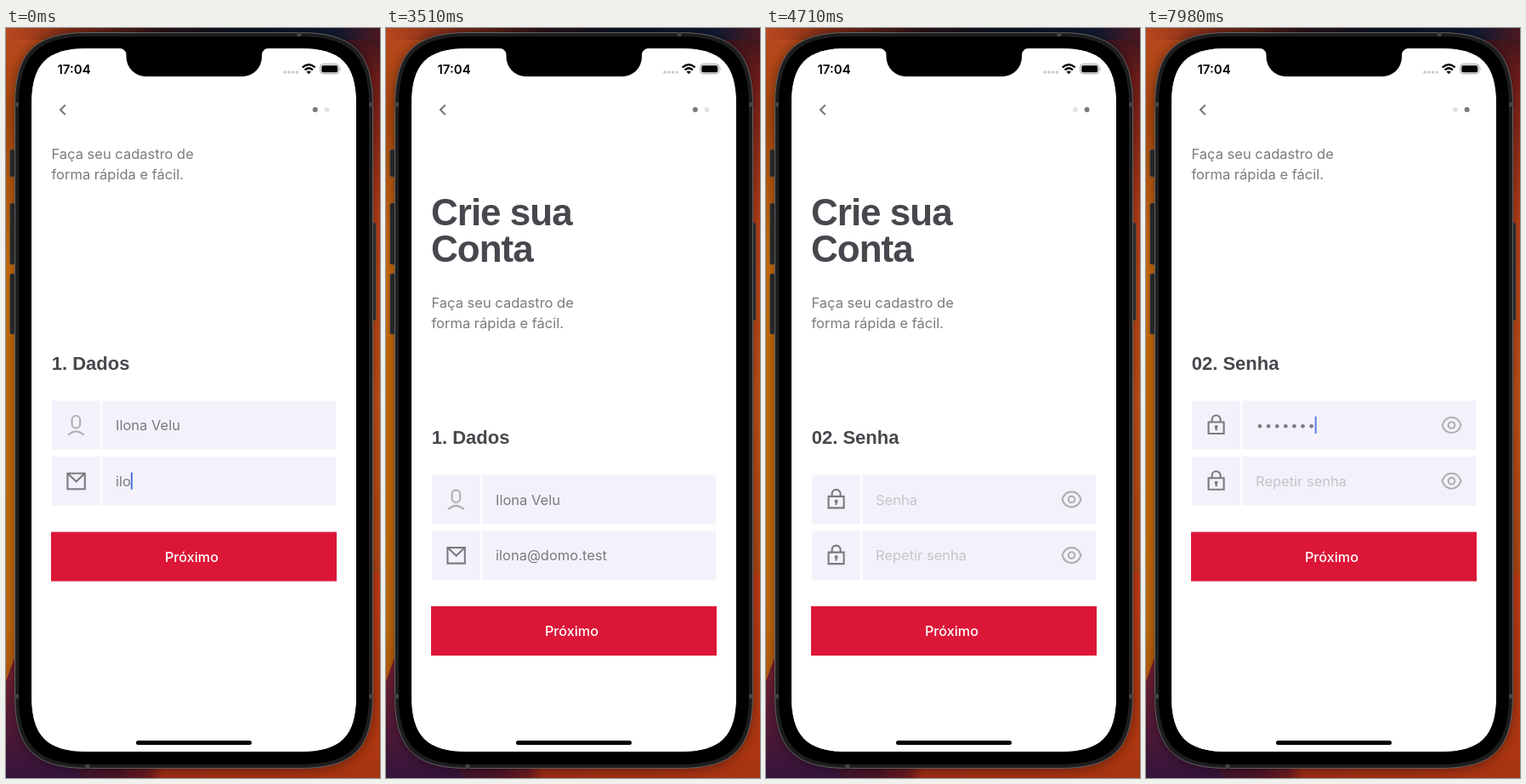
These frames come from a looping animation (440x882 px, 8 s). An HTML page:

```html
<!DOCTYPE html>
<html lang="pt-BR">
<head>
<meta charset="utf-8">
<title>Cadastro</title>
<style>
  html, body { margin: 0; width: 100%; height: 100%; overflow: hidden; background: #000; }
  svg { display: block; width: 100vw; height: 100vh; }
  text { font-family: Inter, sans-serif; font-size: 16.5px; fill: #7a7a80; white-space: pre; }
  .title, .section { font-family: "Liberation Sans", Arial, sans-serif; font-weight: 700; fill: #47474d; }
  .title { font-size: 44px; letter-spacing: -1px; }
  .section { font-size: 22px; }
  .hint { fill: #c4c4ca; }
  .label { font-size: 16.2px; font-weight: 500; fill: #fff; text-anchor: middle; }
  .clock { font-size: 15px; font-weight: 600; fill: #000; }
  .icon { fill: none; stroke: #7a7a80; stroke-width: 2.1; }
  .soft { stroke: #aeaeb3; }
</style>
</head>
<body>
<svg viewBox="0 0 440 882" preserveAspectRatio="none">
  <defs>
    <linearGradient id="left" x2="0" y2="1">
      <stop offset="0" stop-color="#b8481e"/><stop offset=".12" stop-color="#a9480f"/>
      <stop offset=".3" stop-color="#c8690e"/><stop offset=".55" stop-color="#c56a08"/>
      <stop offset=".8" stop-color="#c0680c"/><stop offset="1" stop-color="#a03e18"/>
    </linearGradient>
    <linearGradient id="right" x2="0" y2="1">
      <stop offset="0" stop-color="#30141f"/><stop offset=".07" stop-color="#741d1a"/>
      <stop offset=".25" stop-color="#b43e19"/><stop offset=".5" stop-color="#c25018"/>
      <stop offset=".725" stop-color="#b04614"/><stop offset=".73" stop-color="#c23c16"/>
      <stop offset="1" stop-color="#a83510"/>
    </linearGradient>
    <linearGradient id="top">
      <stop offset="0" stop-color="#b8481e"/><stop offset=".2" stop-color="#7c2a17"/>
      <stop offset=".42" stop-color="#2a1218"/><stop offset=".6" stop-color="#0d1222"/>
      <stop offset=".88" stop-color="#111a33"/><stop offset="1" stop-color="#4c1820"/>
    </linearGradient>
    <linearGradient id="bottom">
      <stop offset="0" stop-color="#34143a"/><stop offset=".3" stop-color="#4a1426"/>
      <stop offset=".38" stop-color="#6a1a1e"/><stop offset=".42" stop-color="#9c2c16"/>
      <stop offset="1" stop-color="#a83510"/>
    </linearGradient>
    <linearGradient id="dusk" x2="0" y2="1">
      <stop offset="0" stop-color="#7a2232"/><stop offset="1" stop-color="#34143a"/>
    </linearGradient>
    <filter id="blur"><feGaussianBlur stdDeviation="7"/></filter>
    <path id="body" d="M10.500 91.500C10.500 28.500 33.500 5.500 96.500 5.500H345.500C408.500 5.500 431.500 28.500 431.500 91.500V784.500C431.500 847.500 408.500 870.500 345.500 870.500H96.500C33.500 870.500 10.500 847.500 10.500 784.500Z"/>
    <path id="glass" d="M30 90C30 42 48 24 96 24H346C394 24 412 42 412 90V785C412 833 394 851 346 851H96C48 851 30 833 30 785Z"/>
    <clipPath id="display"><use href="#glass"/></clipPath>
  </defs>

  <g id="wallpaper">
    <rect width="220" height="882" fill="url(#left)"/>
    <rect x="220" width="220" height="882" fill="url(#right)"/>
    <rect width="440" height="14" fill="url(#top)"/>
    <rect y="862" width="440" height="20" fill="url(#bottom)"/>
    <path d="M0 768L11 738L90 882H0Z" fill="url(#dusk)"/>
    <use href="#body" filter="url(#blur)" opacity=".45"/>
  </g>

  <g id="phone">
    <g fill="#252526" stroke="#484848" stroke-width=".8">
      <rect x="4.8" y="143" width="8" height="32" rx="2"/>
      <rect x="4.8" y="206" width="8" height="72" rx="2"/>
      <rect x="4.8" y="289" width="8" height="71" rx="2"/>
      <rect x="427" y="229" width="8" height="115" rx="2"/>
    </g>
    <use href="#body" fill="#1d1d1e" stroke="#626264"/>
    <path d="M15 92C15 32 37 10 97 10H345C405 10 427 32 427 92V784C427 844 405 866 345 866H97C37 866 15 844 15 784Z"/>
    <path d="M10 90h5M427 90h5M10 786h5M427 786h5M96 866v5M345 5v5" stroke="#444" stroke-width="5"/>
  </g>

  <g clip-path="url(#display)">
    <use href="#glass" fill="#fff"/>
    <g id="screens"></g>
  </g>

  <g id="status">
    <path d="M134 24A7.500 7.500 0 0 1 141.500 31.500V34A23 23 0 0 0 164.500 57H278A23 23 0 0 0 301 34V31.500A7.500 7.500 0 0 1 308.500 24V22H134Z"/>
    <text class="clock" x="60.500" y="53.500">17:04</text>
    <g fill="#c9c9cb">
      <circle cx="328" cy="52" r="1.8"/><circle cx="332.700" cy="52" r="1.8"/>
      <circle cx="337.400" cy="52" r="1.8"/><circle cx="342.100" cy="52" r="1.8"/>
    </g>
    <g fill="none" stroke="#000" stroke-width="2.3">
      <path d="M348.800 46.300Q356.200 39.600 363.600 46.300M351.500 49.300Q356.200 45.200 360.900 49.300"/>
    </g>
    <path d="M353.600 51.500Q356.200 49.300 358.800 51.500L356.200 54.200Z"/>
    <rect x="369.800" y="42.400" width="22" height="11.400" rx="3.400" fill="none" stroke="#999"/>
    <rect x="371.300" y="43.900" width="19" height="8.400" rx="2"/>
    <path d="M393 46.300q1.600 1.700 0 3.600z" fill="#999"/>
    <rect x="153" y="838" width="136" height="5" rx="2.500"/>
  </g>
</svg>

<script>
const LOOP = 8000;
const WIDTH = 382;
const FIELD_TOPS = [525.7, 591.4];
const EMAIL = 'ilona@domo.test';
const EMAIL_KEYS = [-400, -250, -60, 30, 150, 390, 600, 720, 840, 1290, 1440, 1620, 1950, 2130, 2310];
const PASSWORD_KEYS = [6060, 6120, 6330, 6480, 6990, 7200, 7500];
const PRESS = 3360, BLUR = 3510, PUSH = 3557, FOCUS = 5100;

const icons = {
  user: y => `<g class="icon soft"><rect x="77.600" y="${y - 11}" width="9.600" height="14.500" rx="4.800"/>
    <path d="M73 ${y + 11.5}Q82.400 ${y + 3.5} 91.800 ${y + 11.5}"/></g>`,
  mail: y => `<path class="icon" d="M72.400 ${y - 9}h20.400v18.500h-20.400zl10.200 9.500l10.200 -9.500"/>`,
  lock: y => `<path class="icon" d="M73.600 ${y - 3.5}h18v13.500h-18zM77.600 ${y - 3.5}v-3a5 5 0 0 1 10 0v3M82.600 ${y + 2}v4.500"/>
    <circle cx="82.600" cy="${y + 2}" r="2" fill="#7a7a80"/>`,
  eye: y => `<g class="icon soft"><path d="M348.500 ${y}C352.500 ${y - 12} 366.500 ${y - 12} 370.500 ${y}
    C366.500 ${y + 12} 352.500 ${y + 12} 348.500 ${y}Z"/><circle cx="359.500" cy="${y}" r="3.800"/></g>`
};

function field(index, icon, text, isPassword) {
  const top = FIELD_TOPS[index], middle = top + 28.7;
  return `<path d="M54 ${top}h57v57.500h-57zM113.300 ${top}h274.700v57.500h-274.700z" fill="#f3f2fb"/>
    ${icons[icon](middle)}
    <text class="value${index}${isPassword ? ' hint' : ''}" x="129" y="${top + 35}">${text}</text>
    ${isPassword ? icons.eye(middle) : ''}`;
}

function screen(id, activeDot, section, fields) {
  const dot = (x, i) => `<circle cx="${x}" cy="96" r="3" fill="${i === activeDot ? '#7a7a80' : '#e3e3e7'}"/>`;
  const button = 'x="53" y="680" width="336" height="58"';
  return `<g id="${id}">
    <rect x="30" y="24" width="${WIDTH}" height="827" fill="#fff"/>
    <path class="icon" d="M69.800 90.500L64 96.200L69.800 102"/>
    ${[363.8, 377.6].map(dot).join('')}
    <g class="heading"><text class="title" x="53" y="231.500">Crie sua</text>
      <text class="title" x="53" y="274.700">Conta</text></g>
    <g class="intro"><text x="53.500" y="328.800">Faça seu cadastro de</text>
      <text x="53.500" y="353.300">forma rápida e fácil.</text></g>
    <g class="form">
      <text class="section" x="53.700" y="489">${section}</text>
      ${fields}
      <rect ${button} fill="#dc1637"/>
      <text class="label" x="218.500" y="715.200">Próximo</text>
      <rect class="press" ${button} opacity="0"/>
      <g class="dots" fill="#7a7a80"></g>
      <rect class="caret" width="1.900" height="20" fill="#426fd8" opacity="0"/>
    </g>
    <rect class="shade" x="30" y="24" width="${WIDTH}" height="827" opacity="0"/>
  </g>`;
}

document.getElementById('screens').innerHTML =
  screen('data', 0, '1. Dados', field(0, 'user', 'Ilona Velu') + field(1, 'mail', '')) +
  screen('password', 1, '02. Senha', field(0, 'lock', 'Senha', true) + field(1, 'lock', 'Repetir senha', true));

const find = selector => document.querySelector(selector);
const set = (selector, name, value) => find(selector).setAttribute(name, value);
const clamp = x => Math.min(1, Math.max(0, x));

function typed(keys, t) {
  return keys.filter(key => key <= t).length;
}

// The caret stays solid after a key, then fades out and in.
function blink(age) {
  const phase = age % 1070;
  return phase < 950 ? 1 - clamp((phase - 470) / 120) : (phase - 950) / 120;
}

function layout(id, focused) {
  set(`#${id} .heading`, 'visibility', focused ? 'hidden' : 'visible');
  set(`#${id} .intro`, 'transform', `translate(0 ${focused ? -174.8 : 0})`);
  set(`#${id} .form`, 'transform', `translate(0 ${focused ? -87.4 : 0})`);
}

function placeCaret(id, index, x, opacity) {
  set(`#${id} .caret`, 'x', x);
  set(`#${id} .caret`, 'y', FIELD_TOPS[index] + 18.6);
  set(`#${id} .caret`, 'opacity', opacity);
}

// Critically damped spring, with the old screen moving at a slower pace.
function slide(t) {
  const s = Math.max(0, t - PUSH) * 0.0223;
  const remaining = (1 + s) * Math.exp(-s);
  const offset = remaining * WIDTH;
  set('#password', 'transform', `translate(${offset < 0.3 ? 0 : offset} 0)`);
  set('#data', 'transform', `translate(${-0.3 * (WIDTH - offset)} 0)`);
  set('#data .shade', 'opacity', 0.07 * (1 - remaining ** 3));
}

function draw(t) {
  slide(t);
  layout('data', t < BLUR);
  layout('password', t >= FOCUS);
  set('#data .press', 'opacity', t >= PRESS && t < BLUR ? 0.1 : 0);

  const letters = typed(EMAIL_KEYS, t);
  const email = find('#data .value1');
  email.textContent = EMAIL.slice(0, letters);
  placeCaret('data', 1, 129 + email.getComputedTextLength(),
    t < BLUR ? blink(t - EMAIL_KEYS[letters - 1]) : 0);

  const count = typed(PASSWORD_KEYS, t);
  const lastInput = count ? PASSWORD_KEYS[count - 1] : FOCUS;
  set('#password .value0', 'visibility', count ? 'hidden' : 'visible');
  find('#password .dots').innerHTML = Array.from({ length: count }, (_, i) =>
    `<circle cx="${134 + 10.1 * i}" cy="${FIELD_TOPS[0] + 30}" r="2.300"/>`).join('');
  placeCaret('password', 0, 128 + 10.1 * count, t >= FOCUS ? blink(t - lastInput) : 0);
}

function tick() {
  draw(performance.now() % LOOP);
  requestAnimationFrame(tick);
}
tick();
</script>
</body>
</html>
```
